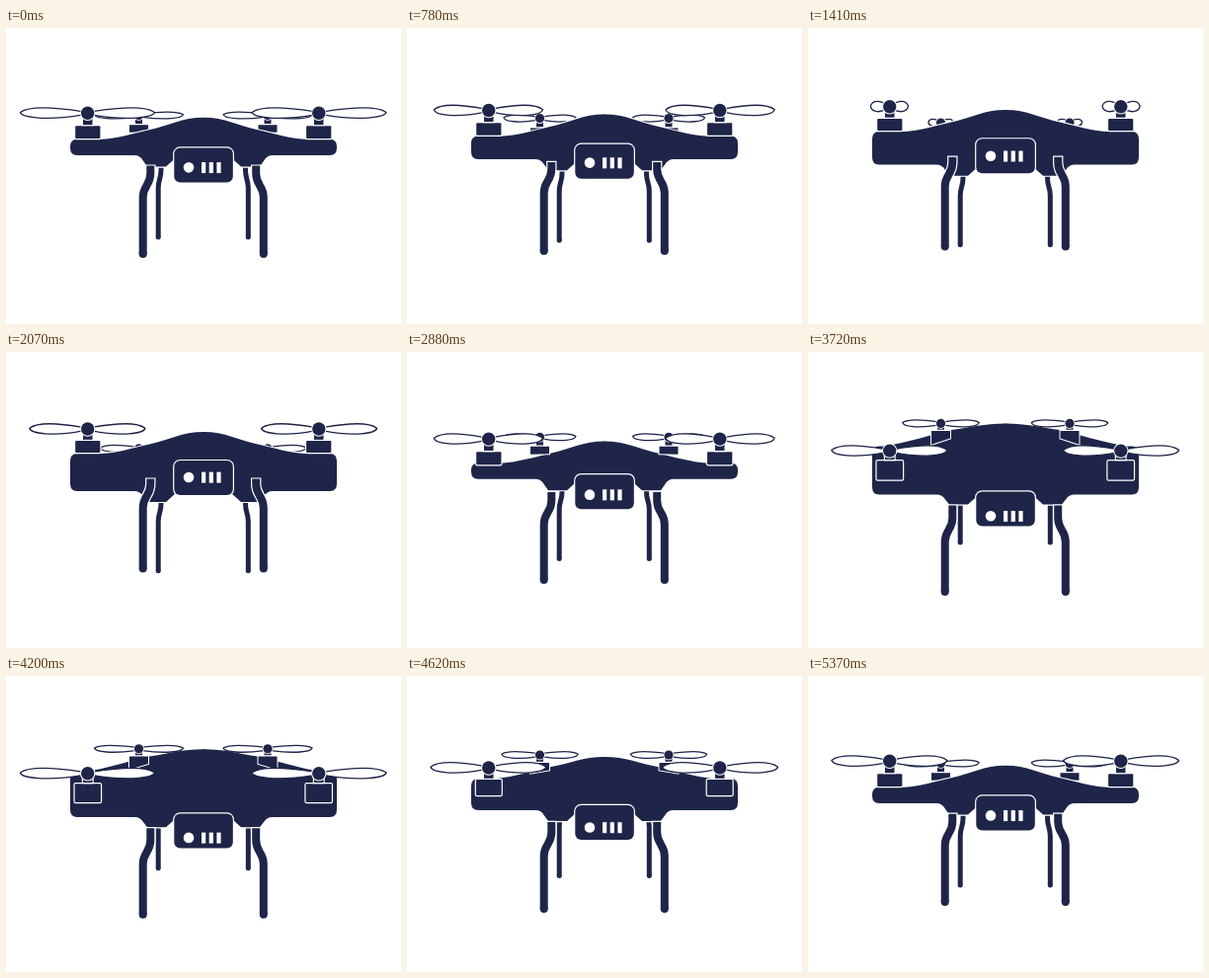
An HTML page with a canvas for the animation above (5400 ms loop, 400x300 px).

```html
<!DOCTYPE html>
<html lang="en">
<head>
<meta charset="utf-8">
<title>Drone</title>
<style>
  html, body { margin: 0; width: 100%; height: 100%; overflow: hidden; background: #fff; }
  canvas { display: block; width: 400px; height: 300px; }
</style>
</head>
<body>
<canvas id="stage" width="400" height="300"></canvas>
<script>
const ctx = document.getElementById('stage').getContext('2d');
const NAVY = '#1e2548';
const WHITE = '#fff';
const LOOP = 5400;
const STEP = 30;

// Pitch of the drone over time, eased between turning points.
const PITCH = [[0, 0], [2010, -8], [3870, 14], [LOOP, 0]];

// Heights of each part at four pitch values; fullness shapes the shoulders.
const NODES = [-8, 1, 7.2, 14];
const PARTS = {
  peak: [81, 92, 82, 72],
  fullness: [0, 0, 0.1, 0.3],
  armTop: [103, 114, 104, 95],
  armBottom: [141, 127.5, 136, 145],
  belly: [152, 139, 147, 155],
  camera: [110, 123, 131, 142],
  hub: [78, 87.3, 93, 100.5],
  baseTop: [90, 100.5, 105, 110.5],
  baseBottom: [102, 113.2, 121, 130],
  backHub: [98, 87.3, 80, 72],
  backBase: [108, 97, 88, 79.5],
  legTop: [128.5, 141, 148, 156],
  legBottom: [223.5, 234.3, 240, 247.5],
  backLegTop: [148, 137, 129, 119],
  backLegBottom: [224.3, 213.3, 205, 195]
};

// Seen width of a spinning blade, five steps per half turn.
const SPIN = [1, 0.81, 0.28, 0.34, 0.86];

const mix = (a, b, k) => a + (b - a) * k;

function pitchAt(t) {
  const i = PITCH.findIndex(p => p[0] > t) - 1;
  const [t0, a] = PITCH[i];
  const [t1, b] = PITCH[i + 1];
  return mix(a, b, (1 - Math.cos(Math.PI * (t - t0) / (t1 - t0))) / 2);
}

function poseAt(pitch) {
  let i = 0;
  while (i < 2 && pitch > NODES[i + 1]) i++;
  const k = (pitch - NODES[i]) / (NODES[i + 1] - NODES[i]);
  const pose = { pitch };
  for (const name in PARTS) pose[name] = mix(PARTS[name][i], PARTS[name][i + 1], k);
  return pose;
}

// Navy shape with a white rim.
function solid(path, rim = 2.4) {
  ctx.lineWidth = rim;
  ctx.strokeStyle = WHITE;
  ctx.stroke(path);
  ctx.fillStyle = NAVY;
  ctx.fill(path);
}

function box(x, y, w, h, r) {
  const path = new Path2D();
  path.roundRect(x, y, w, h, r);
  return path;
}

function disc(x, y, r) {
  const path = new Path2D();
  path.arc(x, y, r, 0, Math.PI * 2);
  return path;
}

function mirrored(draw) {
  draw();
  ctx.save();
  ctx.translate(399.5, 0);
  ctx.scale(-1, 1);
  draw();
  ctx.restore();
}

function blades(x, y, half, thick) {
  for (const side of [-1, 1]) {
    const h = half * side;
    const path = new Path2D();
    path.moveTo(x + h * 0.08, y - 1.6);
    path.bezierCurveTo(x + h * 0.45, y - thick, x + h * 0.85, y - thick * 1.45, x + h, y - 0.8);
    path.bezierCurveTo(x + h * 0.98, y + thick * 0.85, x + h * 0.6, y + thick * 1.4, x + h * 0.08, y + 1.8);
    path.closePath();
    ctx.fillStyle = WHITE;
    ctx.fill(path);
    ctx.strokeStyle = NAVY;
    ctx.lineWidth = 1.3;
    ctx.stroke(path);
  }
}

function backMotor(p, spin) {
  const lean = Math.max(0, p.pitch - 1) / 2;
  const base = new Path2D();
  base.moveTo(125, p.backBase);
  base.lineTo(144, p.backBase);
  base.lineTo(144, p.backBase + 7.5);
  base.lineTo(125, p.backBase + 7.5 + lean);
  base.closePath();
  solid(base, 2);
  solid(box(131, p.backHub + 3, 7, p.backBase - p.backHub - 4.2, 0), 1);
  blades(134.5, p.backHub, 45 * spin, 3.6);
  solid(disc(134.5, p.backHub, 4.6), 1.5);
}

function frontMotor(p, spin) {
  const grow = Math.max(0, p.baseBottom - p.baseTop - 13) * 0.1;
  solid(box(70.2 - grow, p.baseTop, 25.2 + grow * 2, p.baseBottom - p.baseTop, 1));
  solid(box(78, p.hub + 5, 9.5, p.baseTop - p.hub - 6.2, 0), 2.4);
  blades(82.4, p.hub, 68 * spin, 5.5);
  solid(disc(82.7, p.hub, 6.7), 2);
}

function leg([x0, top, x1, straight, bend], width, bottom) {
  for (const [color, extra] of [[WHITE, 1.2], [NAVY, 0]]) {
    const mid = top + straight + bend / 2;
    ctx.beginPath();
    ctx.moveTo(x0, top - extra);
    ctx.lineTo(x0, top + straight);
    ctx.bezierCurveTo(x0, mid, x1, mid, x1, top + straight + bend);
    ctx.lineTo(x1, bottom - width / 2);
    ctx.lineWidth = width + extra * 2;
    ctx.strokeStyle = color;
    ctx.stroke();
    ctx.fillStyle = color;
    ctx.fill(disc(x1, bottom - width / 2, width / 2 + extra));
  }
}

function body(p) {
  const { peak, fullness: f, armTop: top, armBottom: low, belly } = p;
  const slope = k => mix(peak, top, k);
  const half = new Path2D();
  half.moveTo(200, peak);
  half.bezierCurveTo(178, peak, 165, slope(0.38 - f * 0.7), 145, slope(0.57 - f));
  half.bezierCurveTo(128, slope(0.76 - f * 1.1), 112 - f * 40, slope(0.96 - f * 0.35), 98 - f * 75, top);
  half.lineTo(72, top);
  half.quadraticCurveTo(65, top, 65, top + 7.5);
  half.lineTo(65, low - 7.5);
  half.quadraticCurveTo(65, low, 72, low);
  half.lineTo(130, low);
  half.quadraticCurveTo(136, low, 139, (low + belly) / 2);
  half.lineTo(143, belly);
  half.lineTo(162, belly);
  half.lineTo(172, belly - 9);
  half.lineTo(200, belly - 9);
  // One path for both halves, then a strip over the seam.
  const whole = new Path2D(half);
  whole.addPath(half, new DOMMatrix([-1, 0, 0, 1, 400, 0]));
  solid(whole);
  ctx.fillRect(198, peak + 0.2, 4, belly - 9 - peak);
}

function camera(y, pitch) {
  solid(box(170.3, y, 59.5, 35, 6));
  const lens = y + 19.8 + pitch * 0.37;
  ctx.fillStyle = WHITE;
  ctx.fill(disc(185, lens, 5.3));
  for (const x of [198, 205.7, 213.4]) ctx.fillRect(x, lens - 5.3, 4.2, 11);
}

function draw(t) {
  const frame = Math.floor(t / STEP);
  const p = poseAt(pitchAt(frame * STEP));
  const spin = SPIN[frame % SPIN.length];
  const backMotors = () => mirrored(() => backMotor(p, spin));
  const seenFromAbove = p.pitch > 1;
  ctx.fillStyle = WHITE;
  ctx.fillRect(0, 0, 400, 300);
  mirrored(() => leg([157, p.backLegTop, 154.2, 6, 18], 5, p.backLegBottom));
  if (!seenFromAbove) backMotors();
  body(p);
  if (seenFromAbove) backMotors();
  mirrored(() => frontMotor(p, spin));
  mirrored(() => leg([146.3, p.legTop, 138.7, 8 + p.pitch * 0.35, 24], 8, p.legBottom));
  camera(p.camera, p.pitch);
}

const start = performance.now();
function tick() {
  draw((performance.now() - start) % LOOP);
  requestAnimationFrame(tick);
}
tick();
</script>
</body>
</html>
```
